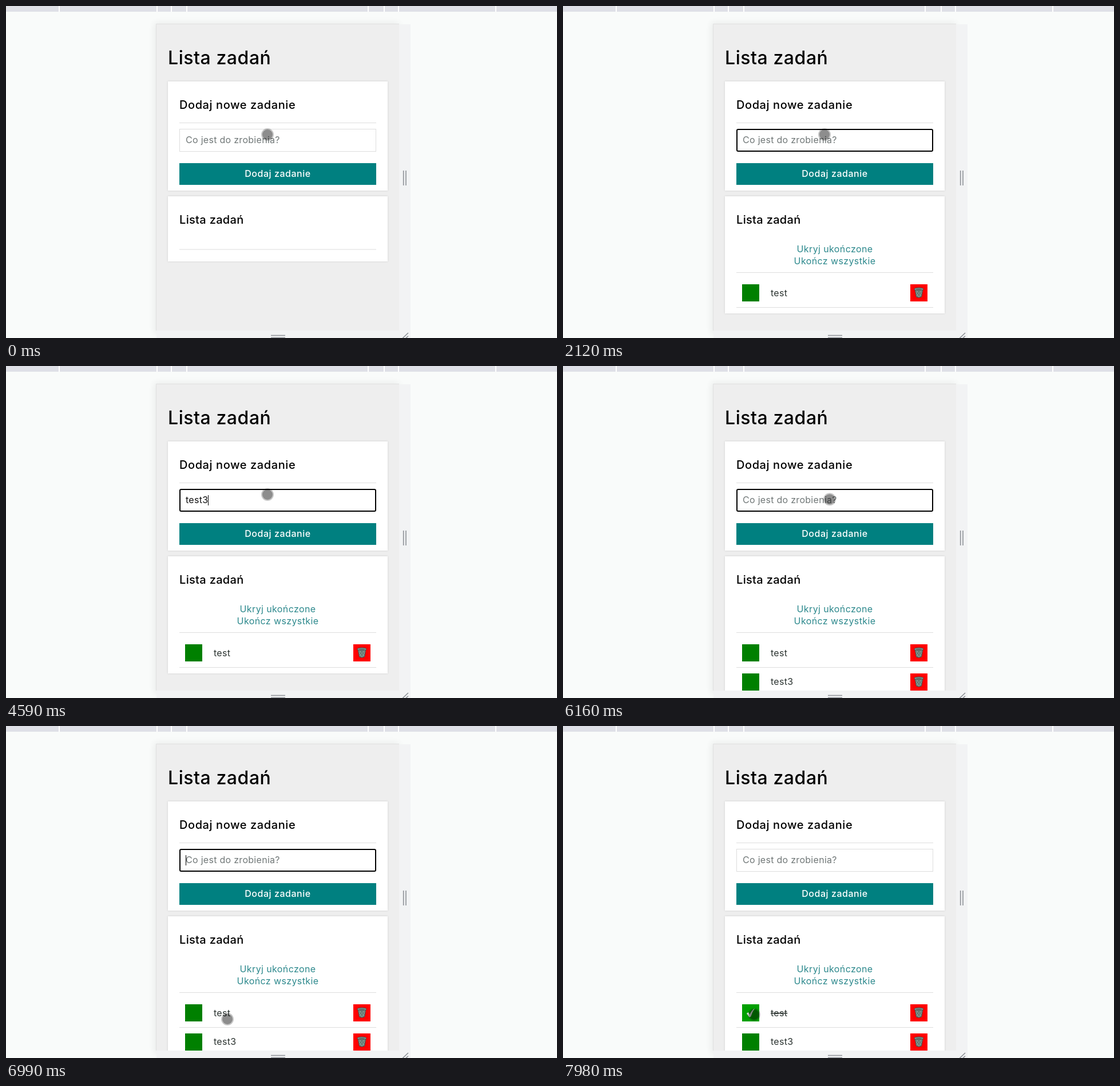
Write an HTML page that moves like this. It is 963x581 px and loops after 8000 ms.

```html
<!DOCTYPE html>
<html lang="pl">
<head>
<meta charset="utf-8">
<title>Lista zadań</title>
<style>
  html, body { margin: 0; width: 100%; height: 100%; overflow: hidden; background: #f9fbfa; }
  svg { display: block; width: 963px; height: 581px; }
  text { font: 400 16px Inter, "Open Sans", sans-serif; letter-spacing: .018em; white-space: pre; }
  .h1 { font-size: 32px; font-weight: 500; letter-spacing: .017em; }
  .h2 { font-size: 20px; font-weight: 500; letter-spacing: .016em; }
  .h2.form { letter-spacing: .029em; }
  .button { fill: #fff; font-weight: 450; letter-spacing: .034em; text-anchor: middle; }
  .link { fill: #2d898d; letter-spacing: .024em; text-anchor: middle; }
  .item { fill: #2c3431; }
  .card { fill: #fff; filter: drop-shadow(0 0 1.5px #ccc); }
  .rule { stroke: #ddd; }
  .grip { stroke: #8d9197; stroke-width: 1.6; fill: none; }
</style>
</head>
<body>
<svg viewBox="0 0 963 581">
  <defs>
    <clipPath id="view"><rect x="263" y="32" width="424" height="536"/></clipPath>
    <filter id="soft" x="-10%" y="-10%" width="120%" height="120%"><feGaussianBlur stdDeviation="6"/></filter>
    <g id="bin">
      <rect width="30" height="30" fill="#f00"/>
      <path d="M8 8.500 L10.500 22 Q15 24.500 19.500 22 L22 8.500 Z" fill="#84998f" stroke="#3f4a48"/>
      <path d="M10 12 L18 22 M14 12 L20 19 M20 12 L12 22 M16 12 L11 18" stroke="#4f605c" stroke-width=".8"/>
      <ellipse cx="15" cy="8.500" rx="8" ry="2.500" fill="#8aa39c" stroke="#3f4a48"/>
      <ellipse cx="15" cy="8.700" rx="5.500" ry="1.200" fill="#5c6d69"/>
    </g>
  </defs>
  <rect width="963" height="581" fill="#f9fbfa"/>
  <rect width="963" height="10" fill="#dfe0e7"/>
  <path id="ticks" stroke="#fff" stroke-width="2"/>

  <rect x="259" y="29" width="428" height="545" fill="#000" opacity=".06" filter="url(#soft)"/>
  <path d="M687 32 H707 V581 H263 V568 H687 Z" fill="#f2f3f4"/>
  <rect x="263" y="32" width="424" height="536" fill="#eee"/>
  <path d="M262.500 568 V31.500 H687" stroke="#e0e0e0" fill="none"/>
  <path class="grip" d="M694.700 288 V314 M699 288 V314 M463 576.500 H488 M463 580.500 H488 M693 581.500 L703 572 M698.500 581.500 L703 577.500"/>

  <g clip-path="url(#view)">
    <text class="h1" x="283" y="102">Lista zadań</text>
    <rect class="card" x="283" y="132" width="384" height="191"/>
    <text class="h2 form" x="303" y="180">Dodaj nowe zadanie</text>
    <path class="rule" d="M303 204.500 H647"/>
    <rect id="box" fill="#fff"/>
    <text id="entry" x="314" y="240"></text>
    <rect id="caret" y="226" width="1" height="18"/>
    <rect x="303" y="275" width="344" height="38" fill="teal"/>
    <text class="button" x="475" y="299">Dodaj zadanie</text>

    <rect id="listCard" class="card" x="283" y="333" width="384"/>
    <text class="h2" x="303" y="381">Lista zadań</text>
    <path id="emptyRule" class="rule" d="M303 426 H647"/>
    <g id="items">
      <text class="link" x="475" y="431">Ukryj ukończone</text>
      <text class="link" x="475" y="452">Ukończ wszystkie</text>
      <path class="rule" d="M303 466.500 H647 M303 527.500 H647"/>
      <rect id="toggle" x="313" y="487" width="30" height="30"/>
      <path id="check" d="M321 503 L324 501 L326.500 505 Q329 498 335 494 Q330.500 501 328 509 L325.500 509.500 Z" fill="#eef4ee"/>
      <text id="first" class="item" x="363" y="508">test</text>
      <use href="#bin" x="607" y="487"/>
      <g id="second">
        <rect x="313" y="538" width="30" height="30" fill="#008000"/>
        <text class="item" x="363" y="558">test3</text>
        <use href="#bin" x="607" y="538"/>
      </g>
    </g>
  </g>
  <g id="cursor">
    <circle r="11" fill="#000" fill-opacity=".22"/>
    <circle id="dot" r="9" fill="#000"/>
  </g>
</svg>
<script>
const LOOP = 8000;
const $ = id => document.getElementById(id);
const set = (id, attrs) => { for (const k in attrs) $(id).setAttribute(k, attrs[k]); };
const show = (id, on) => set(id, { visibility: on ? "visible" : "hidden" });

// Last value whose start time has passed.
const at = (steps, t) => steps.reduce((v, [start, next]) => t >= start ? next : v, steps[0][1]);

const typed = [[0, ""], [1320, "t"], [1440, "te"], [1570, "test"], [2120, ""],
  [3200, "t"], [3400, "te"], [3600, "tes"], [3730, "test"], [4590, "test3"], [4850, ""]];
const caretOn = [[0, 0], [440, 1], [990, 0], [1320, 1], [2120, 0], [2400, 1], [4260, 0],
  [4590, 1], [4850, 0], [5130, 1], [5620, 0], [6500, 1], [7030, 0]];
const pressed = [[0, 0], [70, 1], [440, 0], [7840, 1], [7980, 0]];
const path = [[5880, 457, 225], [6150, 466, 233], [6300, 469, 262], [6490, 465, 348],
  [6687, 446, 442], [6850, 412, 491], [6955, 387, 513], [7090, 366, 522], [7370, 341, 509],
  [7570, 337, 507], [7700, 334, 505]];

// The pointer is sampled about every 67 ms while it moves.
function pointer(time) {
  if (time < 5950) return path[0].slice(1);
  const t = 5950 + Math.floor((time - 5950) / 67) * 67;
  const i = path.findIndex(p => p[0] > t);
  if (i < 0) return path[path.length - 1].slice(1);
  const [t0, x0, y0] = path[i - 1], [t1, x1, y1] = path[i];
  const k = (t - t0) / (t1 - t0);
  return [x0 + (x1 - x0) * k, y0 + (y1 - y0) * k];
}

function draw(t) {
  const text = at(typed, t), focus = t >= 440 && t < 7840;
  const count = t >= 4850 ? 2 : t >= 2120 ? 1 : 0;
  const done = t >= 7980;

  set("box", focus
    ? { x: 304, y: 216, width: 342, height: 38, rx: 2, stroke: "#000", "stroke-width": 2 }
    : { x: 303.5, y: 215.5, width: 343, height: 39, rx: 0, stroke: "#ddd", "stroke-width": 1 });
  $("entry").textContent = text || "Co jest do zrobienia?";
  set("entry", { fill: text ? "#111" : "#707777" });
  set("caret", { x: 314 + (text ? Math.round($("entry").getComputedTextLength()) : 0) });
  show("caret", at(caretOn, t));

  set("listCard", { height: [114, 205, 256][count] });
  show("emptyRule", !count);
  show("items", count);
  show("second", count > 1);
  const hover = Math.min(1, Math.max(0, (t - 7570) / 270));
  set("toggle", { fill: `rgb(0,${128 + 32 * hover},0)` });
  show("check", done);
  set("first", { "text-decoration": done ? "line-through" : "none" });

  const [x, y] = pointer(t);
  set("cursor", { transform: `translate(${x} ${y})` });
  set("dot", { "fill-opacity": at(pressed, t) ? .5 : .29 });
}

set("ticks", { d: [93, 264, 289, 316, 633, 661, 686, 856].map(x => `M${x} 0 V10`).join(" ") });
const start = performance.now();
function tick() {
  draw((performance.now() - start) % LOOP);
  requestAnimationFrame(tick);
}
tick();
</script>
</body>
</html>
```
